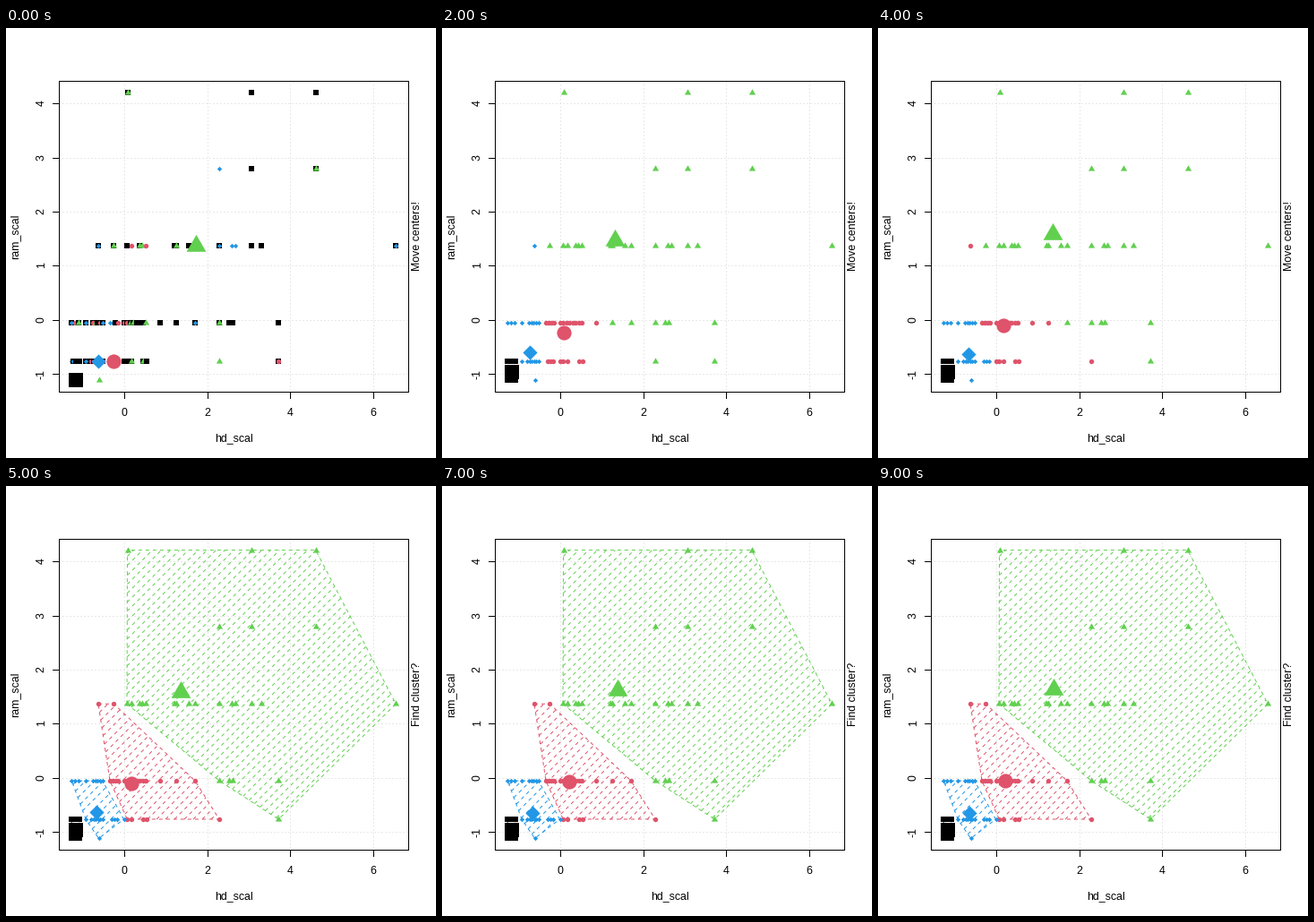
These frames come from a looping animation (480x480 px, 10000 ms). A matplotlib script:

```python
import random

import numpy as np
import matplotlib.pyplot as plt
from matplotlib.animation import FuncAnimation

SIZE = 480
LEFT, RIGHT, TOP, BOTTOM = 59, 449, 59, 406
X0, Y0 = 132.3, 326.3          # pixel position of the data origin
UX, UY = 46.4, 60.4            # pixels per data unit
SMALL, BIG = 2.7, 8.1          # marker radii
KINDS = "krgb"                 # square, circle, triangle, diamond
COLORS = dict(k="#000000", r="#DF536B", g="#61D04F", b="#2297E6")

TRIANGLE = [(0, 1.555), (1.347, -0.778), (-1.347, -0.778), (0, 1.555)]
DIAMOND = [(0, 1), (1, 0), (0, -1), (-1, 0), (0, 1)]
MARKERS = dict(k=("s", 2), r=("o", 2), g=(TRIANGLE, 3.11), b=(DIAMOND, 2))


def run(start, end, n):
    return list(np.linspace(start, end, n))


# columns in use at each memory size
ROWS = {
    32: [135.5, 274.3, 345.7],
    24: [238, 274.3, 345.7],
    16: [103, 120.4, 135, 140] + run(148.5, 156, 3)
        + [188, 190, 204, 211.4, 238, 252, 256, 274.3, 284.5, 435.2],
    8: run(73.3, 80.5, 3) + [89] + run(97, 107.7, 5) + run(116, 125, 4)
       + run(131.5, 156, 8) + [172, 189.5, 211, 238, 249, 252.5, 304.3],
    4: run(73.3, 82, 5) + [89] + run(95, 108, 6) + run(118, 124, 3)
       + [131.5, 135.3, 139.5, 153, 156.5, 238, 304.3],
    2: run(73.3, 81.5, 5) + [103.5],
}
PTS = np.array([(x, 393.4 - (size - 2) * 10.727)
                for size, xs in ROWS.items() for x in xs])

# cluster centres in the order of KINDS
START = np.array([(77.7, 393), (120, 372), (211.5, 243), (103, 372)])
FIRST = np.array([(78.3, 384), (136, 340), (193, 237), (98, 362)])
FINAL = np.array([(78.3, 384), (142.2, 329), (196.5, 226.8), (101.7, 365)])

fig = plt.figure(figsize=(SIZE / 72, SIZE / 72), dpi=72, facecolor="white")
plt.rcParams["font.family"] = "Liberation Sans"
ax = fig.add_axes([0, 0, 1, 1])
ax.set_xlim(0, SIZE)
ax.set_ylim(SIZE, 0)
ax.axis("off")
live = []


def line(xs, ys, color="black", dash=None, z=2):
    return ax.plot(xs, ys, color=color, lw=1, ls=(0, dash) if dash else "-",
                   dash_capstyle="butt", zorder=z)[0]


def label(x, y, text, angle=0):
    return ax.text(x, y, text, fontsize=12.4, rotation=angle, ha="center",
                   va="baseline", rotation_mode="anchor")


def marks(pts, kind, radius, z):
    shape, scale = MARKERS[kind]
    pts = np.atleast_2d(pts)
    live.append(ax.plot(pts[:, 0], pts[:, 1], ls="", marker=shape, mew=0,
                        ms=scale * radius, color=COLORS[kind], zorder=z)[0])


def frame_and_axes():
    for v in range(0, 7, 2):
        x = int(X0 + UX * v)
        line([x, x], [TOP, BOTTOM], "#D3D3D3", (1, 3), 1)
        line([x, x], [BOTTOM, BOTTOM + 7])
        label(x + 0.3, 433.3, str(v))
    for v in range(-1, 5):
        y = int(Y0 - UY * v)
        line([LEFT, RIGHT], [y, y], "#D3D3D3", (1, 3), 1)
        line([LEFT - 7, LEFT], [y, y])
        label(42.8, y, str(v), 90)
    line([LEFT, RIGHT, RIGHT, LEFT, LEFT], [TOP, TOP, BOTTOM, BOTTOM, TOP])
    label(254, 461.5, "hd_scal")
    label(13.4, 232.5, "ram_scal", 90)


def centers(move):
    """Each move covers most of the way that is left."""
    if move == 0:
        return START
    return FINAL + (FIRST - FINAL) * 0.3 ** (move - 1)


def nearest(cs):
    d = (PTS[:, None] - cs[None]) / (UX, UY)
    return (d ** 2).sum(axis=2).argmin(axis=1)


def hull(pts):
    pts = sorted(set(map(tuple, pts)))

    def chain(seq):
        out = []
        for p in seq:
            while len(out) > 1 and (
                    (out[-1][0] - out[-2][0]) * (p[1] - out[-2][1])
                    <= (out[-1][1] - out[-2][1]) * (p[0] - out[-2][0])):
                out.pop()
            out.append(p)
        return out[:-1]

    return np.array(chain(pts) + chain(pts[::-1]))


def hatch(poly, color):
    """Dashed 45 degree lines, 10 per inch, counted from the data origin."""
    step = 7.2 * np.sqrt(2)
    ring = np.vstack([poly, poly[:1]])
    sums = ring.sum(axis=1)
    base = X0 + Y0
    first = int(np.ceil((sums.min() - base) / step))
    last = int(np.floor((sums.max() - base) / step))
    for k in range(first, last + 1):
        c = round(base + k * step) + 0.01
        ends = [p + (q - p) * (c - sp) / (sq - sp)
                for p, q, sp, sq in zip(ring, ring[1:], sums, sums[1:])
                if (sp - c) * (sq - c) < 0]
        if len(ends) == 2:
            (xa, ya), (xb, yb) = sorted(map(tuple, ends))
            live.append(line([xa, xb], [ya, yb], color, (4, 4), 3))
    live.append(line(ring[:, 0], ring[:, 1], color, (4, 4), 3))


def shuffled_start():
    """Random clusters, with machines of equal specs piled on one spot."""
    rng = random.Random(8)
    for p in PTS:
        if rng.random() < 0.65:
            marks(p, "k", SMALL, 4)
        marks(p, rng.choice("kkrgb"), SMALL, 4)


def draw(i):
    while live:
        live.pop().remove()
    move, finding = divmod(i, 2)
    hint.set_text("Find cluster?" if finding else "Move centers!")
    if i == 0:
        shuffled_start()
    else:
        group = nearest(centers((i - 1) // 2))
        for j, kind in enumerate(KINDS):
            members = PTS[group == j]
            marks(members, kind, SMALL, 4)
            if finding:
                hatch(hull(members), COLORS[kind])
    for kind, c in zip(KINDS, centers(move)):
        marks(c, kind, BIG, 6)
    return live


frame_and_axes()
hint = label(462, 232.5, "", 90)
anim = FuncAnimation(fig, draw, frames=10, interval=1000, repeat=True,
                     repeat_delay=0, blit=False)
plt.show()
```
